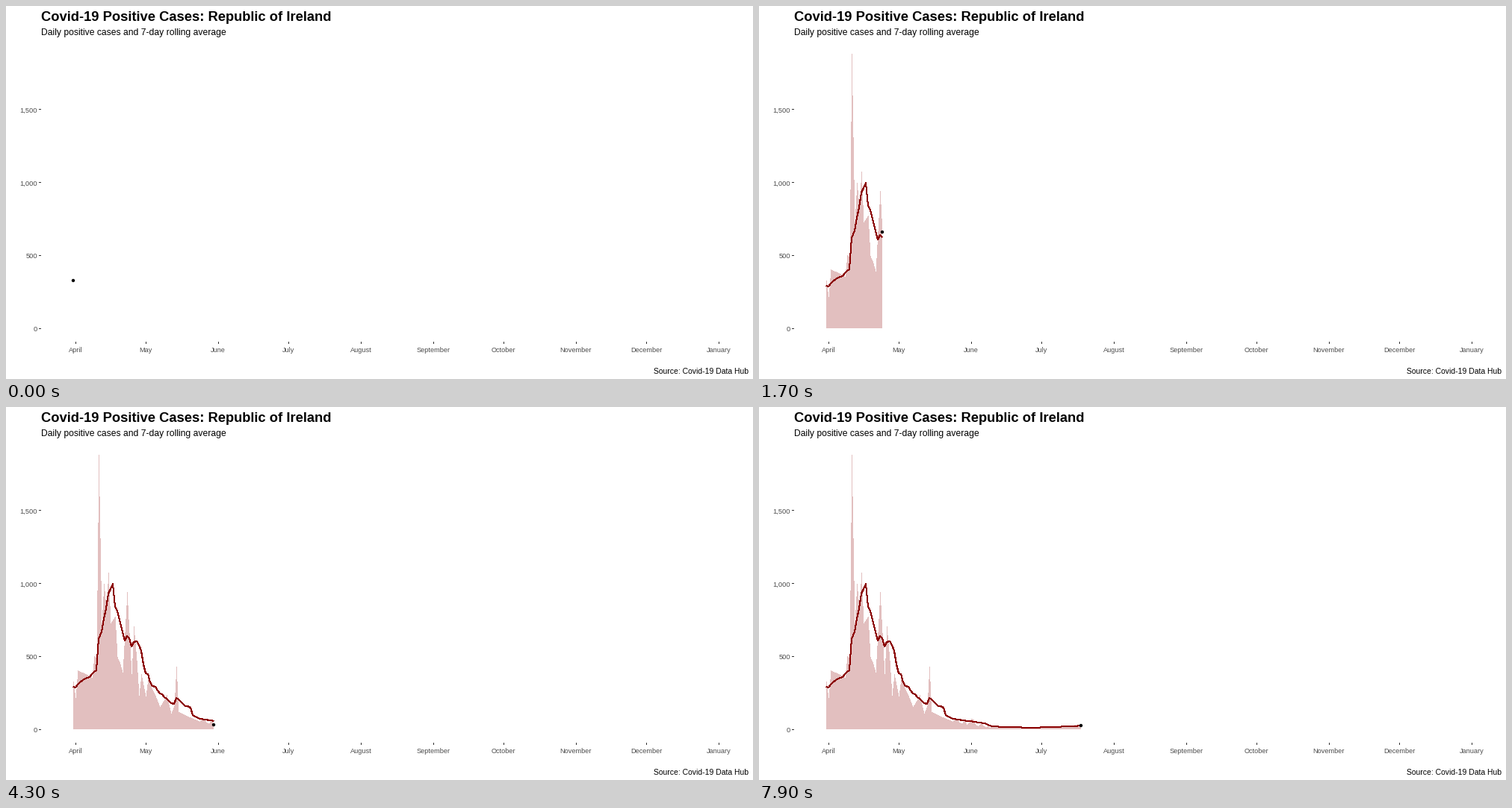
Recreate the animation shown at these times as a matplotlib script. Size 1000 by 500 pixels, loop 8 s.

```python
import numpy as np
import matplotlib.pyplot as plt
from matplotlib.animation import FuncAnimation
from matplotlib.patches import Circle

W, H, DPI = 1000, 500, 100
FRAMES, INTERVAL = 80, 100
PT = 72 / DPI  # points per pixel
X0, DAY_W = 89.98, 3.131  # 31 March, pixels per day
Y0, CASE_H = 431.55, 0.196  # zero line, pixels per case
BASE = 432
RATE, LEAD = 275 / 199, 0.7  # days revealed per frame
FIRST, LAST, CALM = -6, 109, 54  # days since 31 March

# Turning points of the daily cases as (day, cases).
TURNS = [
    (-6, 250), (0, 325), (1, 212), (2, 400), (8, 352), (9, 500), (10, 480),
    (11, 1874), (12, 727), (13, 992), (14, 832), (15, 1068), (16, 724),
    (18, 770), (19, 493), (21, 388), (23, 936), (25, 377), (26, 701),
    (28, 229), (29, 376), (31, 221), (32, 343), (37, 150), (40, 230),
    (42, 107), (43, 159), (44, 426), (45, 115), (54, 50), (62, 50),
    (68, 17), (88, 9), (109, 23),
]
MONTH_STARTS = {
    name: np.datetime64(date) for name, date in [
        ("April", "2020-04-01"), ("May", "2020-05-01"), ("June", "2020-06-01"),
        ("July", "2020-07-01"), ("August", "2020-08-01"),
        ("September", "2020-09-01"), ("October", "2020-10-01"),
        ("November", "2020-11-01"), ("December", "2020-12-01"),
        ("January", "2021-01-01"),
    ]
}

plt.rcParams["font.family"] = ["Liberation Sans", "DejaVu Sans"]
plt.rcParams["path.simplify"] = False


def x_at(day):
    return np.round(X0 + DAY_W * day)


def y_at(cases):
    return np.round(Y0 - CASE_H * cases)


days = np.arange(FIRST, LAST + 1)
cases = np.interp(days, *zip(*TURNS))
jitter = np.random.default_rng(4).uniform(0.5, 1.5, len(days))
cases = np.where((days > CALM) & (days < LAST), cases * jitter, cases)

day_x = x_at(days[-FIRST:])
daily_y = y_at(cases[-FIRST:])
mean_y = y_at(np.convolve(cases, np.ones(7) / 7, "valid"))

fig = plt.figure(figsize=(W / DPI, H / DPI), dpi=DPI, facecolor="white")
ax = fig.add_axes([0, 0, 1, 1])
ax.set_xlim(0, W)
ax.set_ylim(H, 0)
ax.axis("off")


def label(x, y, text, px, ha="left", color="black", weight="normal"):
    ax.text(x, y, text, size=px * PT, ha=ha, va="baseline",
            color=color, weight=weight)


def tick(xs, ys):
    ax.plot(xs, ys, color="#333333", lw=PT, solid_capstyle="butt", snap=False)


label(47, 20, "Covid-19 Positive Cases: Republic of Ireland", 18.34, weight="bold")
label(47, 39, "Daily positive cases and 7-day rolling average", 12.18)
label(994, 493, "Source: Covid-19 Data Hub", 10.4, ha="right")

for name, date in MONTH_STARTS.items():
    x = x_at((date - np.datetime64("2020-03-31")).astype(int))
    tick([x + 0.5, x + 0.5], [450, 453])
    label(x, 464, name, 9.2, ha="center", color="#4D4D4D")

for value in range(0, 2000, 500):
    y = y_at(value)
    tick([44, 47], [y + 0.5, y + 0.5])
    label(42, y + 4.5, f"{value:,}", 9.3, ha="right", color="#4D4D4D")

area, = ax.fill([0], [0], color="#E2BFBF", lw=0)
line, = ax.plot([], [], color="#8B0000", lw=PT, antialiased=False,
                solid_capstyle="butt", solid_joinstyle="round", snap=False)
dot = ax.add_patch(Circle((0, 0), 2.2, color="black", lw=0, zorder=5))


def columns(xs, ys):
    """Outline of one-pixel columns under the polyline."""
    edges = np.arange(xs[0], xs[-1] + 1)
    tops = np.round(np.interp(edges[:-1], xs, ys))
    steps = np.concatenate([[BASE], np.repeat(tops, 2), [BASE]])
    return np.column_stack([np.repeat(edges, 2), steps])


def draw(frame):
    n = int(frame * RATE + LEAD) + 1
    xs, ys = day_x[:n], daily_y[:n]
    area.set_xy(columns(xs, ys))
    line.set_data(xs, mean_y[:n])
    dot.center = xs[-1], ys[-1]
    return area, line, dot


anim = FuncAnimation(fig, draw, frames=FRAMES, interval=INTERVAL,
                     repeat=True, repeat_delay=0, blit=False)
plt.show()
```
